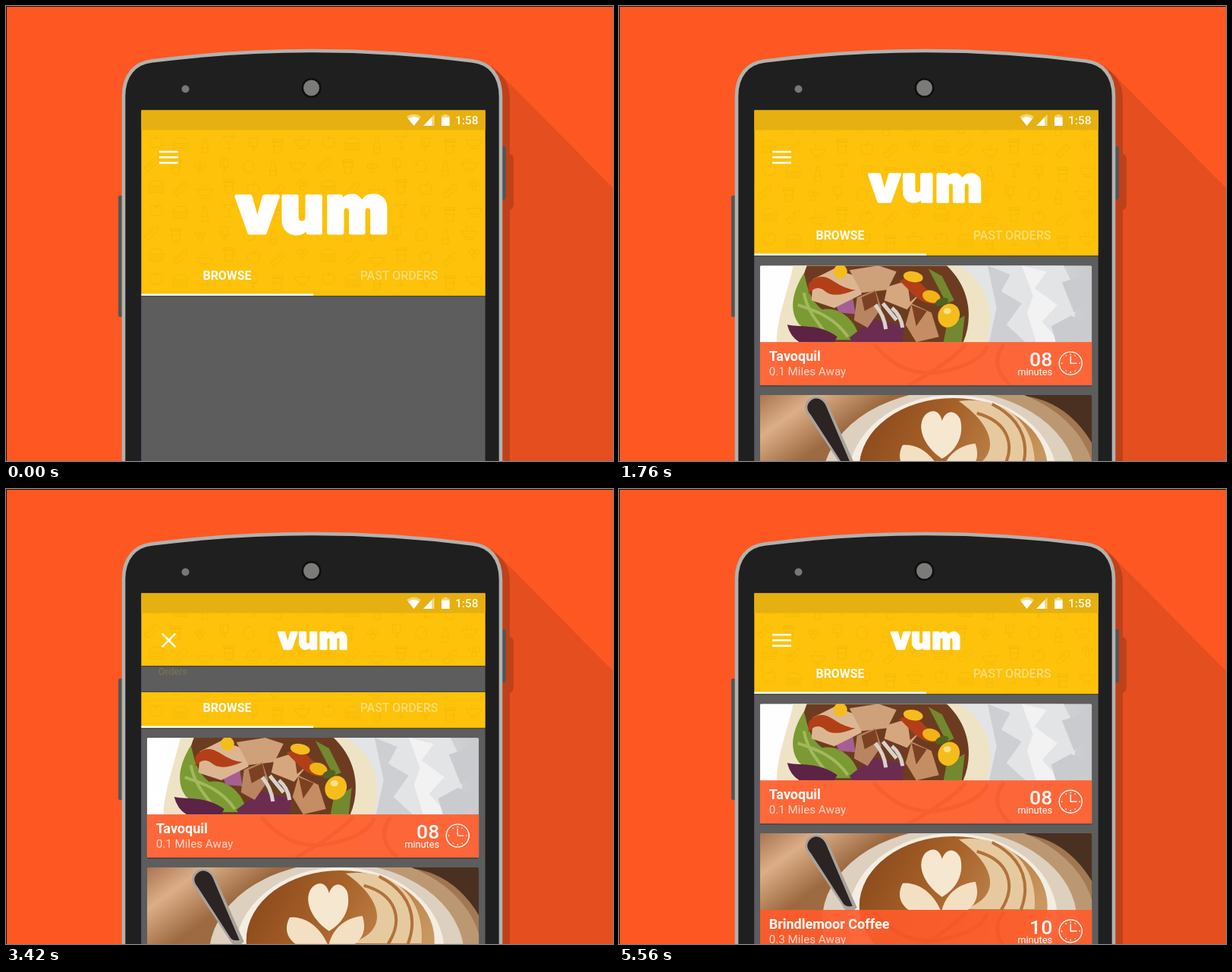
Recreate the animation shown at these times as an HTML page. Size 800 by 600 pixels, loop 7400 ms.

```html
<!DOCTYPE html>
<html lang="en">
<head>
<meta charset="utf-8">
<title>Food ordering app</title>
<style>
  html, body { margin: 0; width: 100%; height: 100%; overflow: hidden; background: #ff5722; }
  svg { display: block; width: 100vw; height: 100vh; }
  text { font-family: Roboto, "Open Sans", sans-serif; fill: #fff; }
  .mid { text-anchor: middle; }
  .end { text-anchor: end; }
  .med { font-weight: 500; }
  .semi { font-weight: 600; }
  .brand { font-family: Inter, Lato, sans-serif; font-weight: 900; font-size: 88px; letter-spacing: .03em;
    stroke: #fff; stroke-width: 5; stroke-linejoin: round; }
  .line { fill: none; stroke-linecap: round; stroke-linejoin: round; }
</style>
</head>
<body>
<svg id="stage" viewBox="0 0 800 600" preserveAspectRatio="xMidYMid meet"></svg>
<script>
const LOOP = 7400, STEP = 20;
const HEADER = 382, SEAM = 233, SCROLL = 112, OPEN = 100, GAP = 78;
const YELLOW = '#fdc209';
const stage = document.getElementById('stage');

const at = (x, y, body, more = '') => `<g transform="translate(${x} ${y})" ${more}>${body}</g>`;
const path = (d, fill, more = '') => `<path d="${d}" fill="${fill}" ${more}/>`;
const rect = (x, y, w, h, fill, more = '') =>
  `<rect x="${x}" y="${y}" width="${w}" height="${h}" fill="${fill}" ${more}/>`;
const oval = (x, y, rx, ry, fill, turn = 0) =>
  `<ellipse rx="${rx}" ry="${ry}" fill="${fill}" transform="translate(${x} ${y}) rotate(${turn})"/>`;
const text = (x, y, size, body, cls = '', more = '') =>
  `<text x="${x}" y="${y}" font-size="${size}" class="${cls}" ${more}>${body}</text>`;

// Faint food doodles in the header, each about 18px wide
const food = {
  apple: 'M0-4C-4-8-9-5-8 1-7 7-3 9 0 7 3 9 7 7 8 1 9-5 4-8 0-4ZM0-4Q0-8 4-9',
  burger: 'M-10-1Q-9-8 0-8T10-1ZM-11 2H11M-9 5H9V8H-9Z',
  bottle: 'M-2-10H2V-4Q4-2 4 0V9H-4V0Q-4-2-2-4ZM-4 2H4',
  cocktail: 'M-8-7H8L0 1ZM0 1V9M-4 9H4M3-5L7-11',
  ice: 'M-5-8H5V3H-5ZM-1 3V9H1V3M-2-5V0',
  cup: 'M-6-6H6L4 9H-4ZM-7-9H7V-6H-7ZM-5 0H5',
  bowl: 'M-10-2H10Q8 6 3 6H-3Q-8 6-10-2ZM-5 9H5M-3-5V-8M2-5V-8',
  grapes: 'M-7-4A3 3 0 1 0-1-4 3 3 0 1 0-7-4M1-4A3 3 0 1 0 7-4 3 3 0 1 0 1-4M-3 2A3 3 0 1 0 3 2 3 3 0 1 0-3 2M0-7V-10',
  egg: 'M0-9C5-9 8-1 7 3 5 9-5 9-7 3-8-1-5-9 0-9Z',
  dog: 'M-9 4L4-9Q9-9 9-4L-4 9Q-9 9-9 4ZM-5 3L4-5'
};
const doodleRows = [
  [18, ['apple', 'burger', 'bottle', 'cocktail', 'ice', 'cup', 'bowl']],
  [48, ['dog', 'cup', 'grapes', 'ice', 'egg', 'bottle', 'bowl']],
  [77, ['burger', 'dog', 'bowl', 'cup', 'apple', 'dog', 'grapes']]
];
const doodles = doodleRows.map(([y, names], r) => names.map((name, i) =>
  at(20 + i * 32 - (r === 1 ? 6 : 0), y + (i % 3 - 1) * 3, `<path d="${food[name]}"/>`)).join('')).join('');

const burrito =
  rect(0, 0, 438, 158, 'url(#plate)') +
  path('M262 0H400L420 40 408 101 438 158H280Q310 60 262 0Z', '#e3e4e6') +
  path('M300 0L330 12 318 34 345 50 325 78 350 101H302L312 56Z', '#cdcfd3') +
  path('M345 0L378 8 362 30 392 52 372 74 396 101H364L352 62 360 40Z', '#f2f2f3') +
  path('M398 22L424 14 436 44 414 62ZM384 80L410 66 434 78 420 101H390Z', '#cacbcf') +
  path('M44 0H262C296 18 314 62 298 101L278 158H28L22 101C22 70 38 30 44 0Z', '#efe3c6') +
  path('M62 0H246C276 28 282 68 268 101H66C44 78 50 30 62 0Z', '#6d3c20') +
  path('M58 10C42 36 38 60 52 78L92 98H132C126 70 104 54 82 58 64 44 62 24 58 10Z', '#7b9a33') +
  path('M50 52C74 60 98 68 116 94M58 36C62 58 72 70 86 88', 'none', 'stroke="#a3b85c" stroke-width="4"') +
  path('M36 78C56 82 76 76 102 94L98 101H52Q40 94 36 78Z', '#5d2345') +
  path('M118 95L150 70 190 80 188 101H122Z', '#6c2c50') +
  path('M98 46L122 40 126 64 104 62Z', '#a65f92') +
  path('M70 18L98 4 132 16 134 38 98 56 68 46Z', '#dcb692') +
  path('M118 6L156 0 180 8 168 32 134 36Z', '#cfa17a') +
  path('M128 42L152 32 160 56 142 82 124 72Z', '#b98560') +
  path('M168 28L194 20 212 36 194 58 164 46Z', '#d6a67e') +
  path('M200 50L226 62 236 94 206 101 192 78Z', '#c58d63') +
  path('M134 42L152 34 156 50 138 60ZM194 20L212 36 198 48ZM200 52L220 60 206 80Z', '#7c4122') +
  path('M64 24Q78 8 96 20T126 32Q98 44 86 34T64 38ZM184 20Q202 10 218 30L246 46Q224 58 204 40Z', '#b23f18') +
  path('M152 52Q164 66 166 84M162 50L180 72M174 56Q186 66 188 82', 'none', 'stroke="#d8d2cc" stroke-width="5"') +
  path('M222 4L240 14 256 46 246 50ZM246 80L270 66 266 101H242Z', '#72892f') +
  oval(106, 8, 9, 9, '#f4bd1d') + oval(202, 15, 13, 7, '#f4bd1d', 10) + oval(226, 41, 12, 8, '#f0b416', 15) +
  oval(249, 66, 14, 16, '#f5bd1c', 25) + oval(247, 60, 5, 4, '#fbe08a') +
  oval(240, 48, 9, 5, '#4f6420', -20);

const coffee =
  rect(0, 0, 438, 158, 'url(#table)') +
  path('M190 0H438V64Q400 0 330 0Z', '#4a3020') +
  oval(272, 118, 170, 132, '#bb9872') + oval(250, 116, 168, 122, '#ddd0be') +
  oval(254, 112, 138, 112, '#f4ede2') +
  oval(255, 96, 124, 92, 'url(#brew)') +
  path('M262 8C334 0 366 48 362 100H268C318 86 314 44 262 8Z', '#e7c9a0') +
  path('M286 24C330 36 338 70 318 101M306 12C350 34 356 70 344 101', 'none', 'stroke="#b0723a" stroke-width="4"') +
  path('M240 84C214 66 206 40 218 26 230 16 238 24 240 34 246 18 258 20 264 32 270 54 258 74 240 84Z', '#f6e7d0') +
  path('M238 101C226 74 204 64 188 66 180 82 186 94 196 101ZM240 101C246 78 264 66 284 64 290 82 284 94 274 101Z', '#f3dfc2') +
  path('M61 9C68-2 84 0 90 13L128 98 122 103Q112 104 108 94L64 28Q57 18 61 9Z', '#a9a29b') +
  path('M64 11C70 1 82 3 87 14L122 96Q112 98 109 91L67 26Q60 18 64 11Z', '#2b2422');

const clock = `<g class="line" stroke="#fff" stroke-width="1.4"><circle r="15"/><path d="M0-9V0H8"/>
  <path d="M0-12V-11.4M0 12V11.4M-12 0H-11.4M12 0H11.4M-6-10V-9.8M6-10V-9.8M-6 10V9.8M6 10V9.8"/></g>`;

const card = (y, photo, name, miles, mins) => at(185.7, y,
  rect(0, 1.5, 437.5, 158, '#454545', 'rx="2"') +
  `<g clip-path="url(#cardClip)">${photo}${rect(0, 101, 438, 57, '#ff5c2b', 'opacity=".92"')}
    ${path('M150 104Q190 150 240 140T300 106M196 158Q250 128 272 104M330 158Q300 130 322 104', 'none',
      'stroke="#e2481c" stroke-width="5" opacity=".25"')}</g>` +
  text(12, 126, 18, name, 'semi') +
  text(12, 145, 15.2, `${miles} Miles Away`, '', 'opacity=".75"') +
  text(385.5, 133, 26.5, mins, 'end med') + text(385.5, 145, 12.8, 'minutes', 'end') +
  at(409.5, 129, clock));

const menu = [
  [220, 'Orders', 'M-11 7Q-10-7 0-7T11 7ZM-12 10H12M-1-10H1M0-10V-7M-7 3Q-6-2-2-3'],
  [307, 'Accounts', 'M-11-9H11Q13-9 13-7V8Q13 10 11 10H-11Q-13 10-13 8V-7Q-13-9-11-9ZM-13-4H13M-8 1H-3M3 1H8M-8 5H-5M-2 5H2'],
  [400, 'Badges', 'M-6-10H6V-3Q5 3 0 4-5 3-6-3ZM-6-8H-10Q-10 0-5 0M6-8H10Q10 0 5 0M0 4V8M-4 11V8H4V11Z'],
  [489, 'Notification', 'M-10-4H-1L8-9V8L-1 4H-10ZM-1-4V4M10-9V8M-7 4V10H-2V4'],
  [586, 'Settings', '']
];
// Gear outline from eight teeth
menu[4][2] = Array.from({ length: 32 }, (_, i) => {
  const r = (i + 1) % 4 < 2 ? 10.5 : 7.5, a = i * Math.PI / 16;
  return (i ? 'L' : 'M') + (r * Math.cos(a)).toFixed(1) + ' ' + (r * Math.sin(a)).toFixed(1);
}).join('') + 'ZM-3.5 0A3.5 3.5 0 1 0 3.5 0 3.5 3.5 0 1 0-3.5 0';
const labelX = [220, 307, 397, 489, 584.5];

const header = (id, clip) => `<g clip-path="url(#${clip})"><g id="${id}">
  ${rect(178, 0, 454, HEADER, YELLOW)}${rect(178, 0, 454, HEADER, 'url(#doodles)')}</g></g>`;
const clip = (id, box) => `<clipPath id="${id}">${box}</clipPath>`;
const shades = (id, dir, ...stops) => `<linearGradient id="${id}" ${dir}>${stops.map(([o, c]) =>
  `<stop offset="${o}" stop-color="${c}"/>`).join('')}</linearGradient>`;

stage.innerHTML = `<defs>
  ${clip('screen', rect(178.4, 137.5, 453.2, 463, '#000'))}
  ${clip('cardClip', rect(0, 0, 437.5, 158, '#000', 'rx="2"'))}
  ${clip('topClip', rect(178, 137, 454, SEAM - 137, '#000'))}
  ${clip('tabClip', rect(178, SEAM, 454, 400, '#000', 'id="tabBox"'))}
  ${shades('plate', '', [0, '#fff'], [0.55, '#f3f3f3'], [1, '#c9cacd'])}
  ${shades('table', 'x2="1" y2=".5"', [0, '#a87550'], [0.14, '#dcae88'], [0.32, '#9c6940'], [1, '#a37b56'])}
  ${shades('brew', 'x2="1" y2=".4"', [0, '#854418'], [0.5, '#a9642b'], [1, '#c99860'])}
  <pattern id="doodles" x="178" y="164" width="227" height="90" patternUnits="userSpaceOnUse">
    <g class="line" stroke="#a87800" stroke-opacity=".11" stroke-width="1">${doodles}</g></pattern>
</defs>
${rect(0, 0, 800, 600, '#ff5722')}
${path('M640 78L800 240V600H650Z', '#e54e1f')}
${path('M645 84Q664 98 664 122V195Q669 196 669 203V262Q668 268 664 269V600H645Z', '#bf411a')}
${rect(148, 250, 6, 160, '#555', 'rx="2"')}${rect(653, 185, 6, 70, '#555', 'rx="2"')}
${path('M155 605V119C155 91 170 75 192 72.5Q298 59 403.5 59T615 72.5C637 75 652 91 652 119V605Z', '#1f1f1f',
  'stroke="#b2b2ae" stroke-width="4.6"')}
<circle cx="402.5" cy="108" r="13" fill="#0e0e0e"/><circle cx="402.5" cy="108" r="10.5" fill="#7b7b79"/>
<circle cx="236.5" cy="109.5" r="5" fill="#777"/>
<g clip-path="url(#screen)">
  ${rect(178, 137, 454, 463, '#5d5d5d')}${rect(178, SEAM, 1.4, 367, '#5c577c')}
  <g id="cards">
    ${card(395.2, burrito, 'Tavoquil', '0.1', '08')}
    ${card(566, coffee, 'Brindlemoor Coffee', '0.3', '10')}
  </g>
  <g id="gap">${rect(178, SEAM, 454, 1.5, '#4a4a4a')}<rect id="gapEdge" x="178" width="454" height="1.5" fill="#4a4a4a"/></g>
  ${header('top', 'topClip')}${header('low', 'tabClip')}
  <g id="tabs">
    ${rect(178, HEADER, 454, 1.5, '#3c3a30', 'opacity=".4"')}
    ${rect(178, 379.5, 227, 2.5, '#fff')}
    ${text(291.5, 361, 15.9, 'BROWSE', 'mid semi')}
    ${text(518, 361, 16, 'PAST ORDERS', 'mid med', 'opacity=".45"')}
  </g>
  <g id="logo"><text class="brand mid" y="24">vum</text></g>
  ${menu.map(([x, name, d], i) => `<g class="item">${at(x, 262.5,
    `<path class="line" d="${d}" stroke="${YELLOW}" stroke-width="1.3"/>`)}
    ${text(labelX[i], 292, 13, name, 'mid', `style="fill:${YELLOW}"`)}</g>`).join('')}
  <g transform="translate(214.5 199.5)">${[0, 1, 2].map(() =>
    rect(-12.5, -1.3, 25, 2.6, '#fff', 'class="bar"')).join('')}</g>
  ${rect(178, 137, 454, 26.5, '#e6b010')}
  ${path('M528 146Q537.5 139 547 146L537.5 158Z', '#fff', 'opacity=".45"')}
  ${path('M530 148.5Q537.5 143.5 545 148.5L537.5 158Z', '#fff')}
  ${path('M550 158L564.5 143V158Z', '#fff', 'opacity=".5"')}${path('M550 158L561 146.5V158Z', '#fff')}
  ${path('M574 144.5H577V143H581.5V144.5H584.5V158H574Z', '#fff', 'opacity=".5"')}${rect(574, 147, 10.5, 11, '#fff')}
  ${text(622.5, 156, 15.5, '1:58', 'end med', 'opacity=".92"')}
</g>
${rect(0, 0, 800, 1, '#1a0a06')}${rect(0, 0, 1, 600, '#1a0a06')}`;

const $ = id => document.getElementById(id);
const bars = stage.querySelectorAll('.bar'), items = stage.querySelectorAll('.item');
const move = (node, x, y, more = '') => node.setAttribute('transform', `translate(${x} ${y}) ${more}`);
const ramp = (t, a, b) => Math.min(1, Math.max(0, (t - a) / (b - a)));
const mix = (a, b, p) => a + (b - a) * p;
const easeOut = p => 1 - (1 - p) * (1 - p);

function draw(t) {
  const enter = easeOut(ramp(t, 40, 660));
  const fold = ramp(t, 1580, 1960);
  const open = ramp(t, 3192, 3700) - ramp(t, 5080, 5560);
  const cross = ramp(t, 2940, 3200) - ramp(t, 5080, 5340);
  const up = -SCROLL * fold, shift = up + OPEN * open;

  move($('cards'), 0, shift + 206 * (1 - enter));
  $('cards').setAttribute('visibility', t < 60 ? 'hidden' : 'visible');
  move($('top'), 0, up);
  move($('low'), 0, shift);
  move($('tabs'), 0, shift);
  $('tabBox').setAttribute('y', SEAM + GAP * open);
  $('gapEdge').setAttribute('y', SEAM + GAP * open - 1.5);
  $('gap').setAttribute('visibility', open > 0 ? 'visible' : 'hidden');
  move($('logo'), 405, mix(275, 200.5, fold), `scale(${mix(1, 0.457, fold)})`);

  bars.forEach((bar, i) => {
    const side = i - 1;
    move(bar, 0, side * 7.3 * (1 - cross), `rotate(${-side * 45 * cross})`);
    if (!side) bar.setAttribute('opacity', 1 - cross);
  });
  items.forEach((item, i) => {
    const start = 3380 + i * 130;
    const shown = ramp(t, start, start + 180) - ramp(t, 5080, 5300);
    move(item, 0, -60 * (1 - shown));
    item.setAttribute('opacity', shown);
  });
}

const begin = performance.now();
function tick() {
  const t = (performance.now() - begin) % LOOP;
  draw(Math.floor(t / STEP) * STEP);
  requestAnimationFrame(tick);
}
tick();
</script>
</body>
</html>
```
